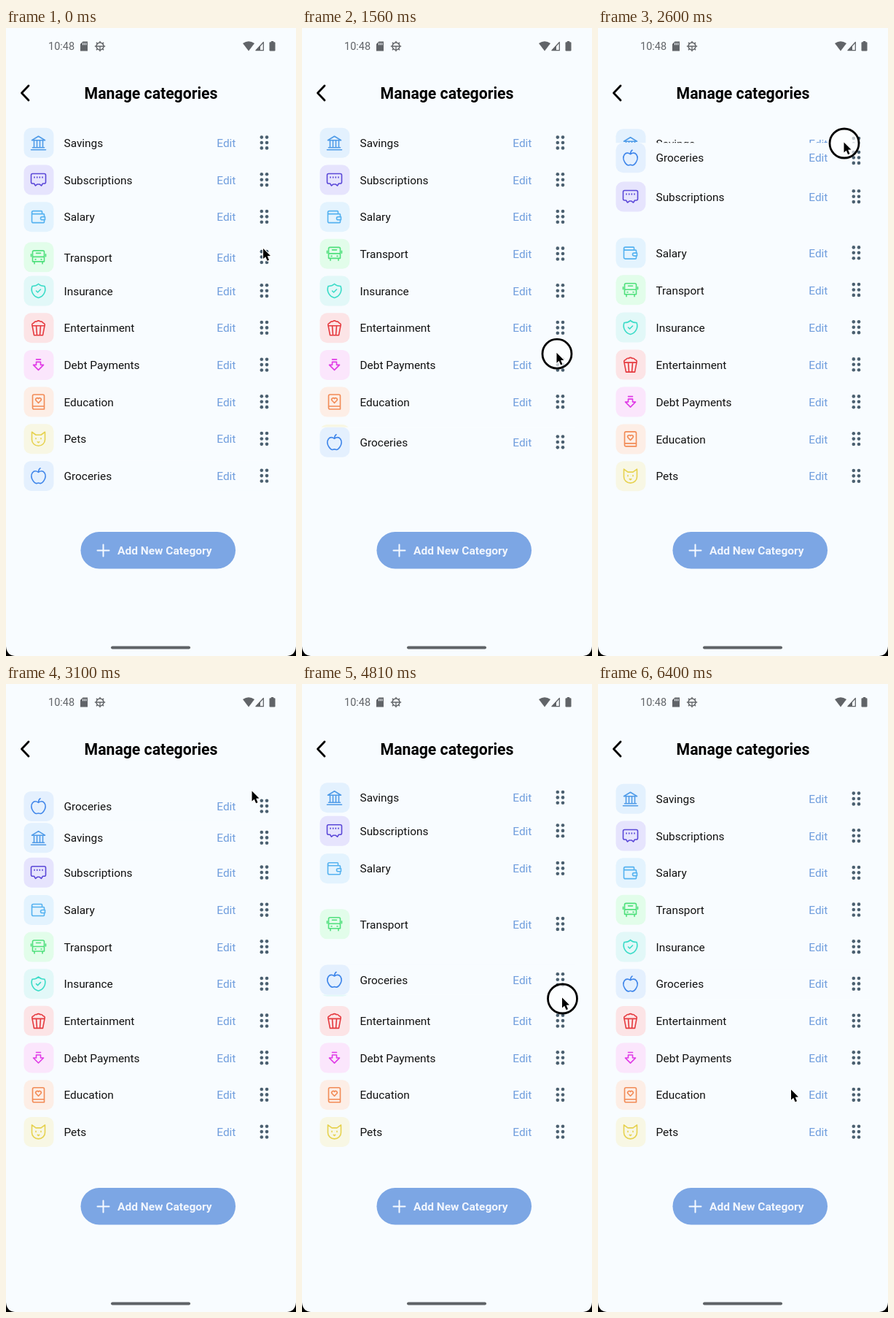
Write an HTML page with a canvas that moves like this. It is 398 px wide and 860 px high and loops after 6630 ms.

```html
<!DOCTYPE html>
<html lang="en">
<head>
<meta charset="utf-8">
<title>Manage categories</title>
<style>
html, body { margin: 0; width: 100%; height: 100%; overflow: hidden; background: #f8fcff; }
canvas { display: block; width: 398px; height: 860px; }
</style>
</head>
<body>
<canvas id="stage"></canvas>
<script>
const W = 398, H = 860, LOOP = 6630;
const BG = '#f8fcff', FONT = 'Roboto, "Open Sans", sans-serif';
const TOP = 157.3, GAP = 50.68, LAG = 105;

const canvas = document.getElementById('stage');
const ctx = canvas.getContext('2d');
const dpr = window.devicePixelRatio || 1;
canvas.width = W * dpr;
canvas.height = H * dpr;

const row = (name, tile, ink, path) => ({ name, tile, ink, path: new Path2D(path) });

// Icons live on a 24 unit grid.
const rows = [
  row('Savings', '#e3f1fe', '#4f9be8',
    'M3 8.5L12 3L21 8.5ZM2 21.5H22M4 18.5H20M6 9V18M10 9V18M14 9V18M18 9V18'),
  row('Subscriptions', '#e6e4fd', '#5b48d8',
    'M4 3.5H20Q22 3.5 22 5.5V15Q22 17 20 17H18L16 20L13.5 18H10.5L8 20L6 17H4Q2 17 2 15V5.5Q2 3.5 4 3.5ZM6.5 8V9M10.2 8V9M13.8 8V9M17.5 8V9'),
  row('Salary', '#e3f3fe', '#55b2f0',
    'M17 8V5a1 1 0 0 0-1-1H5a2 2 0 0 0 0 4h14a1 1 0 0 1 1 1v3M20 16v3a1 1 0 0 1-1 1H5a2 2 0 0 1-2-2V6M21 12v4h-4a2 2 0 0 1 0-4Z'),
  row('Transport', '#e2fdea', '#4fe07c',
    'M6 3H18Q20 3 20 5V18H4V5Q4 3 6 3ZM4 11.5H20M6.5 18V21M17.5 18V21M9 6.5H15M7.5 15H8.5M15.5 15H16.5M2 8V11M22 8V11'),
  row('Insurance', '#e2f8f8', '#3cdcc8',
    'M12 2.5a12 12 0 0 0 8.5 3a12 12 0 0 1-8.5 16a12 12 0 0 1-8.5-16a12 12 0 0 0 8.5-3M9 12l2 2l4-4'),
  row('Entertainment', '#fce4e6', '#e53a3f',
    'M3.5 9L6 22H18L20.5 9M3.5 9Q2.5 6 5.5 5.2Q7 2.5 9.5 3.3Q12 1.2 14.5 3.3Q17 2.5 18.5 5.2Q21.5 6 20.5 9ZM9 9L10 22M15 9L14 22'),
  row('Debt Payments', '#fbe6fc', '#e03ae6',
    'M9 4.5H15M9 8H15V12H19L12 19L5 12H9Z'),
  row('Education', '#fdeee6', '#f28b56',
    'M6 2H18Q20 2 20 4V22H6Q4 22 4 20V4Q4 2 6 2ZM4 18H20M12 13.5L8.6 10A2 2 0 0 1 12 7.6A2 2 0 0 1 15.4 10Z'),
  row('Pets', '#f8f7e4', '#e6d24f',
    'M21 2.5V13A9 8.5 0 0 1 3 13V2.5L8.5 6.5H15.5ZM8.5 11V12M15.5 11V12M10.8 16L12 17L13.2 16')
];
const moved = row('Groceries', '#e4f0fe', '#3f86ea',
  'M12 7Q7 3.5 3.8 7.5Q0.5 12.5 4.5 18.5Q7.5 23 10 22Q12 21.2 14 22Q16.5 23 19.5 18.5Q23.5 12.5 20.2 7.5Q17 3.5 12 7ZM12 7Q12 3 14.5 1.5');

// Pointer keys: time, x, y.
const keys = [
  [20, 353.5, 303.5], [180, 358, 400], [440, 366, 706], [660, 354, 622],
  [900, 352, 617], [1400, 352, 617], [1430, 352, 588], [1455, 352, 559],
  [1515, 351, 482], [1560, 350, 447], [1635, 344, 378], [1722, 337, 325],
  [1795, 332, 277], [1870, 331, 264], [2270, 331, 264], [2370, 333, 226],
  [2470, 336, 173], [2600, 338, 158], [2985, 338, 158], [3070, 338, 148],
  [3130, 338, 148], [3450, 353, 166], [4050, 353, 166], [4205, 353, 213],
  [4310, 353, 258], [4555, 356, 344], [4665, 357, 394], [4760, 357.5, 431],
  [5500, 357.5, 431], [6130, 342, 470], [6380, 265.5, 557]
];
const presses = [[900, 3085], [3500, 5420]];

const secant = (i, c) => (keys[i + 1][c] - keys[i][c]) / (keys[i + 1][0] - keys[i][0]);

function slope(i, c) {
  if (i === 0 || i === keys.length - 1) return 0;
  const a = secant(i - 1, c), b = secant(i, c);
  return a * b <= 0 ? 0 : 2 * a * b / (a + b);
}

// Monotone cubic through the keys.
function pointer(t, c) {
  const last = keys.length - 1;
  if (t <= keys[0][0]) return keys[0][c];
  if (t >= keys[last][0]) return keys[last][c];
  let i = 0;
  while (keys[i + 1][0] < t) i++;
  const [t0, t1] = [keys[i][0], keys[i + 1][0]];
  const d = t1 - t0, u = (t - t0) / d, v = 1 - u;
  return keys[i][c] * (1 + 2 * u) * v * v + keys[i + 1][c] * u * u * (3 - 2 * u)
    + d * (slope(i, c) * u * v * v - slope(i + 1, c) * u * u * v);
}

// What remains of a unit displacement, spring with omega 10 and damping 0.5.
function rest(ms) {
  if (ms <= 0) return 1;
  const s = ms / 1000, w = 8.66 * s;
  return Math.exp(-5 * s) * (Math.cos(w) + 0.577 * Math.sin(w));
}

const slotY = i => TOP + GAP * i;
const up = t => Math.min(slotY(9), pointer(t - LAG, 2) + 9.5);
const down = t => Math.max(slotY(0), pointer(t - LAG, 2) - 9.3);

function movedY(t) {
  const [end1, end2] = [presses[0][1], presses[1][1]];
  if (t < end1) return t < 1400 ? slotY(9) : up(t);
  if (t < 4000) return slotY(0) + (up(end1) - slotY(0)) * rest(t - end1);
  if (t < end2) return down(t);
  return slotY(5) + (down(end2) - slotY(5)) * rest(t - end2);
}

// Neighbours give way when the carried row passes a midpoint.
const swaps = [];
for (let t = 1400, slot = 9; t < presses[1][1]; t += 2) {
  const y = movedY(t);
  if (slot > 0 && y < slotY(slot - 0.5)) swaps.push({ t, row: --slot, dir: 1 });
  else if (slot < 9 && y > slotY(slot + 0.5)) swaps.push({ t, row: slot++, dir: -1 });
}

function rowY(i, t) {
  let y = slotY(i);
  for (const s of swaps) if (s.row === i) y += s.dir * GAP * (1 - rest(t - s.t));
  if (i === 3) y += 11.8 * rest(t + 150);
  return y;
}

function text(str, x, y, size, color, weight = 400, align = 'left') {
  ctx.font = `${weight} ${size}px ${FONT}`;
  ctx.textAlign = align;
  ctx.fillStyle = color;
  ctx.fillText(str, x, y);
}

function box(x, y, w, h, r, color) {
  ctx.fillStyle = color;
  ctx.beginPath();
  ctx.roundRect(x, y, w, h, r);
  ctx.fill();
}

function poly(points, color) {
  ctx.fillStyle = color;
  ctx.beginPath();
  points.forEach(([x, y]) => ctx.lineTo(x, y));
  ctx.closePath();
  ctx.fill();
}

function line(d, color, width) {
  ctx.strokeStyle = color;
  ctx.lineWidth = width;
  ctx.stroke(d instanceof Path2D ? d : new Path2D(d));
}

function drawRow(r, y) {
  box(24.5, y - 20.5, 41, 41, 10, r.tile);
  ctx.save();
  ctx.translate(32.5, y - 12);
  line(r.path, r.ink, 1.6);
  ctx.restore();
  text(r.name, 79.5, y + 5.7, 15.4, '#111');
  text('Edit', 289.3, y + 5.7, 15.4, '#6f9ddd');
  ctx.fillStyle = '#4b6070';
  for (let k = 0; k < 6; k++) {
    ctx.beginPath();
    ctx.arc(k % 2 ? 358 : 350.8, y - 0.3 + (Math.floor(k / 2) - 1) * 7.4, 2.3, 0, 7);
    ctx.fill();
  }
}

function drawStatus() {
  const gray = '#616468';
  text('10:48', 58, 30, 14.5, gray);
  poly([[105.5, 18.5], [112, 18.5], [112, 31.5], [102, 31.5], [102, 22]], gray);
  ctx.fillStyle = BG;
  for (let k = 0; k < 3; k++) ctx.fillRect(105 + k * 2.2, 20.5, 1.1, 2.8);
  ctx.strokeStyle = gray;
  ctx.lineWidth = 1.5;
  ctx.beginPath();
  ctx.arc(129, 25, 5, 0, 7);
  ctx.stroke();
  ctx.beginPath();
  for (let k = 0; k < 8; k++) {
    const a = k * Math.PI / 4, x = Math.cos(a), y = Math.sin(a);
    ctx.moveTo(129 + 5 * x, 25 + 5 * y);
    ctx.lineTo(129 + 6.6 * x, 25 + 6.6 * y);
  }
  ctx.stroke();
  line('M125 25H133M129 25V29', gray, 1.3);
  ctx.fillStyle = gray;
  ctx.fill(new Path2D('M325 21Q333 15.5 341 21L333 31.5Z'));
  line('M353.3 19.5V30.7H343Z', gray, 1.3);
  poly([[349, 24], [349, 31], [342.5, 31]], gray);
  box(361.5, 19.3, 8, 12.2, 1.2, gray);
  ctx.fillRect(363.8, 18, 3.4, 2);
}

function drawFrame() {
  drawStatus();
  line('M31 79L21.5 89L31 99', '#000', 2.8);
  text('Manage categories', 199, 97, 21.2, '#000', 600, 'center');
  box(102.5, 690, 212.5, 50.5, 25.2, '#7ca6e4');
  line('M125.5 715.5H141.5M133.5 707.5V723.5', '#f6faff', 2);
  text('Add New Category', 153, 721, 15.5, '#f1f6fe', 600);
  box(144, 846.5, 109, 4, 2, '#5f6367');
  ctx.fillStyle = '#000';
  ctx.fill(new Path2D('M0 847Q1 859 12 860H0ZM398 847Q397 859 386 860H398Z'));
}

const arrow = new Path2D('M0 0V14L3.2 11.2L5.6 16.8L8 15.8L5.7 10.3L10 10Z');

function drawPointer(t) {
  const x = pointer(t, 1), y = pointer(t, 2);
  if (presses.some(([a, b]) => t >= a && t < b)) {
    ctx.beginPath();
    ctx.arc(x, y, 20, 0, 7);
    ctx.fillStyle = 'rgba(255,255,255,.65)';
    ctx.fill();
    ctx.strokeStyle = '#000';
    ctx.lineWidth = 2.8;
    ctx.stroke();
  }
  ctx.save();
  ctx.translate(x - 0.5, y - 1.5);
  line(arrow, '#fff', 2);
  ctx.fillStyle = '#000';
  ctx.fill(arrow);
  ctx.restore();
}

function draw(t) {
  ctx.setTransform(dpr, 0, 0, dpr, 0, 0);
  ctx.lineCap = ctx.lineJoin = 'round';
  ctx.fillStyle = BG;
  ctx.fillRect(0, 0, W, H);
  drawFrame();
  rows.forEach((r, i) => drawRow(r, rowY(i, t)));
  const y = movedY(t);
  ctx.fillStyle = BG;
  ctx.fillRect(24, y - 20.5, 350, 41);
  drawRow(moved, y);
  drawPointer(t);
}

const start = performance.now();
function tick() {
  draw((performance.now() - start) % LOOP);
  requestAnimationFrame(tick);
}
tick();
</script>
</body>
</html>
```
